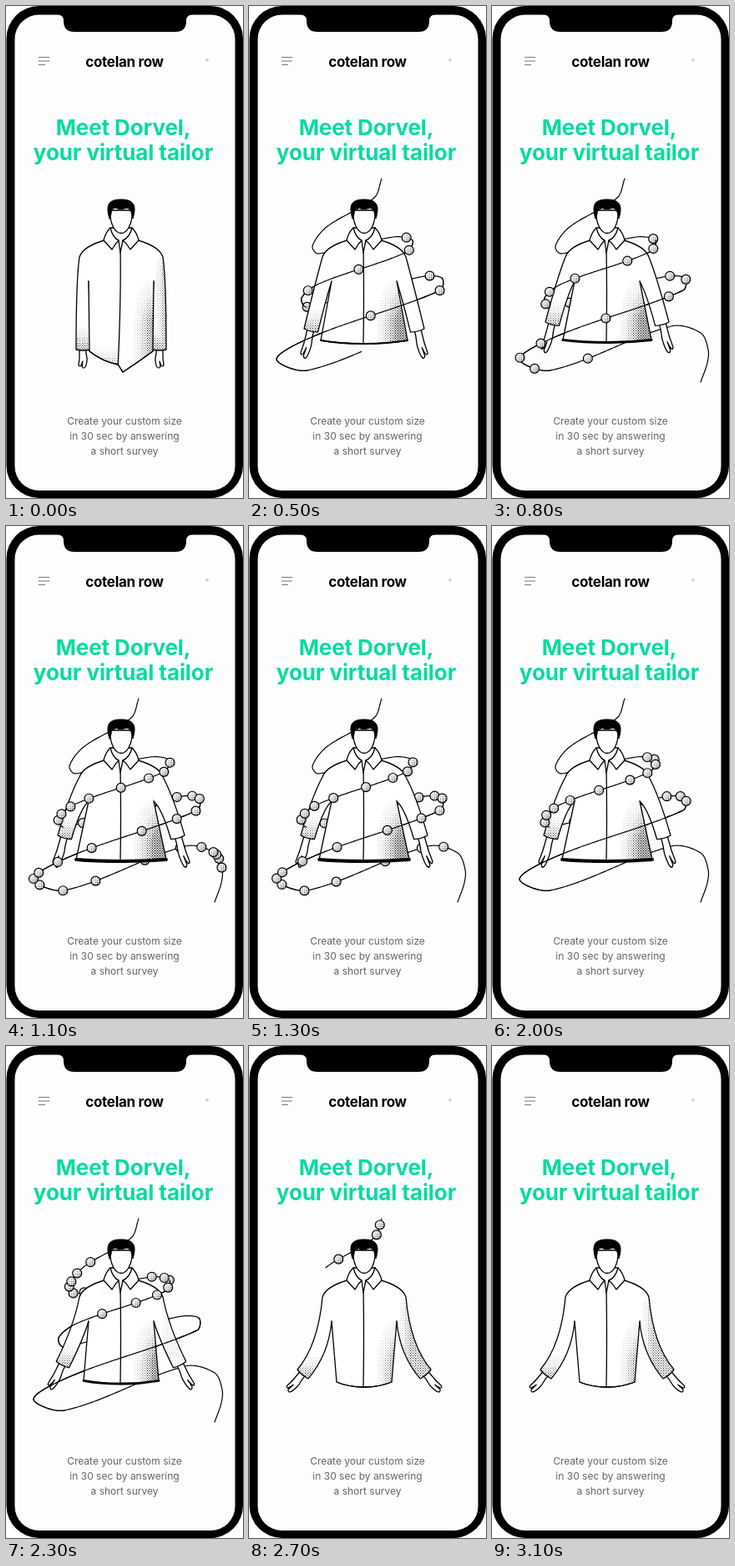
These frames come from a looping animation (284x590 px, 3.14 s). An HTML page with a canvas:

```html
<!DOCTYPE html>
<html lang="en">
<head>
<meta charset="utf-8">
<title>Virtual tailor</title>
<style>
  html, body { margin: 0; width: 100%; height: 100%; overflow: hidden; background: #fff; }
  svg, canvas { position: absolute; left: 0; top: 0; width: 284px; height: 590px; }
  text { font-family: Inter, sans-serif; text-anchor: middle; }
  .brand { font-size: 17px; font-weight: 700; letter-spacing: -.3px; }
  .title { font-size: 26px; font-weight: 700; letter-spacing: -.1px; fill: #05dba2; }
  .note { font-size: 12px; fill: #666; }
</style>
</head>
<body>
<svg viewBox="0 0 284 590">
  <rect x=".5" width="283.5" height="590" rx="39"/>
  <rect x="10.5" y="10.5" width="264" height="570.5" rx="29" fill="#fdfdfd"/>
  <path d="M60 10Q69 10 69 18Q69 31 82 31H203Q216 31 216 18Q216 10 225 10Z"/>
  <path d="M39 61.5H52M39 66H52M39 70.5H47" stroke="#777" stroke-width="1.2"/>
  <circle cx="241" cy="65" r="2" fill="#d4d4d4"/>
  <text class="brand" x="142" y="73">cotelan row</text>
  <text class="title" x="140.5" y="155">Meet Dorvel,</text>
  <text class="title" x="140.5" y="185">your virtual tailor</text>
  <text class="note" x="142" y="502">Create your custom size</text>
  <text class="note" x="142" y="520">in 30 sec by answering</text>
  <text class="note" x="142" y="538">a short survey</text>
</svg>
<canvas></canvas>
<script>
const LOOP = 3140, STEP = 100, CENTER = 138;
const canvas = document.querySelector('canvas');
const ctx = canvas.getContext('2d');
const scale = window.devicePixelRatio || 1;
canvas.width = 284 * scale;
canvas.height = 590 * scale;

const clamp = v => Math.max(0, Math.min(1, v));
const mix = (a, b, k) => a + (b - a) * k;

// Linear keyframes [[time, number or object], ...]
function keyed(keys, t) {
  let i = 0;
  while (i < keys.length - 2 && t >= keys[i + 1][0]) i++;
  const [t0, a] = keys[i], [t1, b] = keys[i + 1];
  const k = clamp((t - t0) / (t1 - t0));
  if (typeof a === 'number') return mix(a, b, k);
  return Object.fromEntries(Object.keys(a).map(name => [name, mix(a[name], b[name], k)]));
}

// Thread: a spline measured by chord length; every third knot is the tip of a bend
const knots = [
  [159, 207], [150, 230], [93, 265],
  [76, 288], [83, 297], [173, 277],
  [196, 281], [189, 295], [84, 333],
  [63, 350], [69, 361], [205, 325],
  [231, 326], [229, 341], [80, 395],
  [33, 423], [70, 437], [215, 384],
  [250, 392], [259, 412], [258, 428], [250, 451]
];
const marks = [0];
for (let i = 1; i < knots.length; i++) {
  marks.push(marks[i - 1] + Math.hypot(knots[i][0] - knots[i - 1][0], knots[i][1] - knots[i - 1][1]));
}
const LAST = knots.length - 1, FULL = marks[LAST];

function threadPoint(s) {
  let i = 0;
  while (i < LAST - 1 && s > marks[i + 1]) i++;
  const len = marks[i + 1] - marks[i], u = (s - marks[i]) / len;
  const tangent = (j, axis) => {
    const lo = Math.max(j - 1, 0), hi = Math.min(j + 1, LAST);
    return (knots[hi][axis] - knots[lo][axis]) / (marks[hi] - marks[lo]) * len;
  };
  return [0, 1].map(axis => {
    const a = knots[i][axis], b = knots[i + 1][axis];
    const m = tangent(i, axis), n = tangent(i + 1, axis);
    return a + u * (m + u * (3 * (b - a) - 2 * m - n + u * (2 * (a - b) + m + n)));
  });
}

// Beads run fast between two bends and bunch up in the bends; one phase unit is one such leg
function phaseToLength(phase) {
  const leg = Math.min(Math.floor(phase), LAST / 3 - 1), u = phase - leg;
  const cubic = u < .5 ? 4 * u ** 3 : 1 - 4 * (1 - u) ** 3;
  return mix(marks[leg * 3], marks[leg * 3 + 3], mix(u, cubic, .6));
}

const reachKeys = [[0, 0], [600, FULL], [2300, FULL], [2700, 93], [2800, 0]];
const leadKeys = [[100, 0], [500, 4.48], [1100, 6.4], [1600, 4.98], [2000, 4.05], [2700, .56], [2800, 0]];
const collarKeys = [[500, 1.8], [1100, 2], [2000, 1.75], [2400, 0]];
const gapKeys = [[500, .33], [1100, .14]];

function beadLengths(t, reach) {
  const collar = keyed(collarKeys, t), gap = keyed(gapKeys, t), lengths = [];
  for (let phase = keyed(leadKeys, t); phase > collar; phase -= gap) lengths.push(phaseToLength(phase));
  return lengths.filter(s => s <= reach);
}

// Left cuff corner, forearm angle, hand length, lower side seam, hem and shading
const loose = { x: 84, y: 412, angle: 0, hand: 22, sideX: 100, sideY: 414, hem: 430, weight: 1.3, dip: 9, tone: 1 };
const middle = { x: 66, y: 387, angle: .24, hand: 34, sideX: 86, sideY: 401, hem: 405, weight: 2.2, dip: 0, tone: .2 };
const boxy = { x: 62, y: 371, angle: .28, hand: 37, sideX: 84, sideY: 400, hem: 402, weight: 4, dip: 0, tone: 0 };
const fitted = { x: 58, y: 388, angle: .7, hand: 27, sideX: 105, sideY: 403, hem: 409, weight: 1.3, dip: 0, tone: .8 };
const poseKeys = [[0, loose], [500, middle], [1100, boxy], [2000, boxy], [2700, fitted], [LOOP, fitted]];
const ARMPIT = [99, 330];

function ink(path, fill, width = 1.3) {
  ctx.lineWidth = width;
  if (fill) { ctx.fillStyle = fill; ctx.fill(path); }
  ctx.stroke(path);
}

// Fills a path with a staggered dot grid; shade(x, y) is the dot radius
function halftone(path, shade) {
  ctx.save();
  ctx.clip(path);
  ctx.fillStyle = '#000';
  ctx.beginPath();
  for (let row = 0, y = 280; y < 442; y += 1.5, row++) {
    for (let x = 45 + row % 2 * 1.5; x < 235; x += 3) {
      const r = shade(x, y);
      if (r < .15) continue;
      ctx.moveTo(x + r, y);
      ctx.arc(x, y, r, 0, 7);
    }
  }
  ctx.fill();
  ctx.restore();
}

function drawHand(x, y, angle, length) {
  ctx.save();
  ctx.translate(x, y);
  ctx.rotate(angle);
  ctx.scale(1, length / 30);
  ink(new Path2D('M4 -3C3 12 6 11 5 18C4 31 1 32 -1 28L0 19C-1 24 -3 30 -5 26C-5 21 -4 18 -4 13V-3'), '#fff');
  ctx.restore();
}

function drawArm({ x, y, angle, hand, tone }, right) {
  const cos = Math.cos(angle), sin = Math.sin(angle);
  // u runs across the cuff towards the body, v along the forearm towards the hand
  const at = (u, v) => [x + u * cos - v * sin, y + u * sin + v * cos];
  const elbow = .75 * (y - 300) * cos * cos;
  const [, cuffY] = at(17, 0);
  ctx.save();
  if (right) { ctx.translate(2 * CENTER, 0); ctx.scale(-1, 1); }
  drawHand(...at(8, 0), angle, hand);
  const sleeve = new Path2D();
  sleeve.moveTo(121, 280);
  sleeve.quadraticCurveTo(92, 288, 88, 301);
  sleeve.quadraticCurveTo(...at(0, -elbow), ...at(0, 0));
  sleeve.quadraticCurveTo(...at(8, 2), ...at(17, 0));
  sleeve.quadraticCurveTo(...at(17, -38), ...ARMPIT);
  ink(sleeve, '#fff');
  halftone(sleeve, (px, py) => {
    const cuff = clamp((py - cuffY + 36) / 36) * .65;
    if (!right) return cuff;
    const edge = clamp((101 - px) / 18) * clamp((py - 285) / 30) * .7;
    return Math.max(cuff, edge) * tone;
  });
  ctx.restore();
}

function drawTorso({ sideX, sideY, hem, weight, dip }) {
  const mirror = x => 2 * CENTER - x;
  const front = CENTER - 1 - dip * .3;
  const addHem = path => {
    path.quadraticCurveTo(mix(sideX, front, .45), hem - dip * .4, front, hem);
    path.lineTo(140, hem + dip);
    path.quadraticCurveTo(mix(mirror(sideX), 140, .5), hem - dip * .3, mirror(sideX), sideY);
  };
  const outline = new Path2D();
  outline.moveTo(...ARMPIT);
  outline.lineTo(sideX, sideY);
  addHem(outline);
  outline.lineTo(mirror(ARMPIT[0]), ARMPIT[1]);
  const body = new Path2D(outline);
  body.lineTo(156, 282);
  body.lineTo(120, 282);
  ctx.fillStyle = '#fff';
  ctx.fill(body);
  halftone(body, (x, y) => Math.max(
    clamp((x - 146) / 34) * clamp((y - 312) / 65) * .8,
    x < front ? clamp((y - hem + 25) / 25) * dip / 16 : 0));
  ink(outline);
  const edge = new Path2D();
  edge.moveTo(sideX, sideY);
  addHem(edge);
  ink(edge, null, weight);
  ink(new Path2D(`M137 288Q138 350 ${front} ${hem}`));
}

function drawHead() {
  ink(new Path2D('M125 266Q119 272 117 281L127 292Q131 285 135 281L137 296L140 281Q145 285 149 292L159 281Q157 272 151 266Z'), '#fff');
  ink(new Path2D('M125 266Q128 278 135 281M151 266Q148 278 140 281'));
  ink(new Path2D('M125 245C124 262 131 272 138 272.5C145 272 152 262 151 245Z'), '#fff');
  ink(new Path2D('M124 255C119 238 123 232 138 232C153 232 157 239 152 255L150 247C148 242 145 242 142 243Q136 245 131 242Q126 243 126 249Z'), '#000', 1);
}

function drawThread(from, to) {
  if (to <= from) return;
  const path = new Path2D();
  for (let s = from; s < to; s += 2) path.lineTo(...threadPoint(s));
  path.lineTo(...threadPoint(to));
  ink(path, null, 1.2);
}

function drawBead(s) {
  const [x, y] = threadPoint(s);
  const bead = new Path2D();
  bead.arc(x, y, 5.5, 0, 7);
  ink(bead, '#fff', 1.2);
  ctx.fillStyle = '#000';
  for (let i = -2; i <= 2; i++) {
    for (let j = -2; j <= 2; j++) {
      const size = .8 + (i + j) * .1;
      if (Math.hypot(i, j) < 2.5) ctx.fillRect(x + i * 2 - size / 2, y + j * 2 - size / 2, size, size);
    }
  }
}

// Stretches of the thread that pass in front of the figure
const fronts = [[marks[6], marks[10]], [marks[12], marks[16]]];
const inFront = s => fronts.some(([from, to]) => s > from && s < to);

function draw(t) {
  const pose = keyed(poseKeys, t), reach = keyed(reachKeys, t);
  const beads = beadLengths(t, reach);
  ctx.setTransform(scale, 0, 0, scale, 0, 0);
  ctx.clearRect(0, 0, 284, 590);
  ctx.strokeStyle = '#000';
  ctx.lineJoin = ctx.lineCap = 'round';

  ctx.save();
  ctx.beginPath();
  ctx.rect(0, 206, 284, 246);
  ctx.clip();
  drawThread(0, reach);
  beads.filter(s => !inFront(s)).forEach(drawBead);
  drawArm(pose, false);
  drawArm(pose, true);
  drawTorso(pose);
  drawHead();
  for (const [from, to] of fronts) drawThread(from, Math.min(reach, to));
  beads.filter(inFront).forEach(drawBead);
  ctx.restore();
}

const start = performance.now();
function tick() {
  const t = (performance.now() - start) % LOOP;
  draw(Math.floor(t / STEP) * STEP);
  requestAnimationFrame(tick);
}
tick();
</script>
</body>
</html>
```
